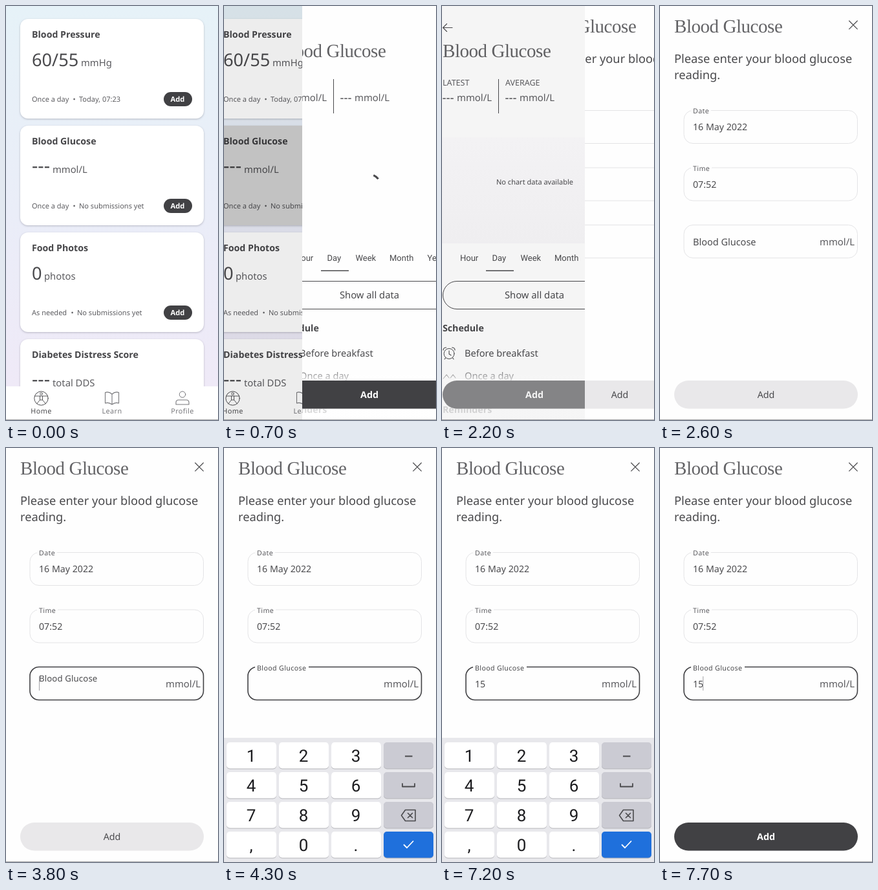
An HTML page that plays this animation: 328 px wide and 640 px high, repeating every 8 s.

```html
<!DOCTYPE html>
<html lang="en">
<head>
<meta charset="utf-8">
<title>Blood glucose entry</title>
<style>
html, body { margin: 0; width: 100%; height: 100%; overflow: hidden; background: #fff; }
#stage { position: relative; width: 328px; height: 640px; overflow: hidden; }
.page { position: absolute; inset: 0; overflow: hidden; }
svg { position: absolute; left: 0; top: 0; display: block; }
text { font-family: "Noto Sans", "Open Sans", sans-serif; fill: #4a4a4d; text-rendering: geometricPrecision; white-space: pre; }
.b { font-weight: 600; fill: #464649; }
.mid { font-weight: 500; }
.m { text-anchor: middle; }
.w { fill: #fff; }
.light { fill: #5c5c60; }
.rob { font-family: Roboto, sans-serif; }
.key { font-family: Roboto, sans-serif; fill: #1c1c1f; text-anchor: middle; }
.serif { font-family: "Liberation Serif", serif; fill: #636366; letter-spacing: -.45px; }
.label { letter-spacing: .4px; }
.line { fill: none; stroke: #4a4a4d; stroke-linecap: round; stroke-linejoin: round; }
.idle .line { stroke: #77777b; }
.idle text { fill: #77777b; }
.card { filter: drop-shadow(0 1.2px 1.5px rgba(60, 60, 75, .3)); }
</style>
</head>
<body>
<div id="stage">
  <div class="page"><svg id="home" width="328" height="640"></svg></div>
  <div class="page"><svg id="detail" width="328" height="640"></svg></div>
  <div class="page"><svg id="entry" width="328" height="640"></svg></div>
</div>
<script>
const W = 328, LOOP = 8000, TICK = 100, DARK = '#414144';
const $ = id => document.getElementById(id);

const text = (x, y, size, str, cls = '', more = '') =>
  `<text x="${x}" y="${y}" font-size="${size}" class="${cls}" ${more}>${str}</text>`;
const rect = (x, y, w, h, r, fill, more = '') =>
  `<rect x="${x}" y="${y}" width="${w}" height="${h}" rx="${r}" fill="${fill}" ${more}/>`;
const line = (d, width = 1.1, more = '') =>
  `<path class="line" d="${d}" stroke-width="${width}" ${more}/>`;
const circle = (x, y, r, width = 1) =>
  `<circle class="line" cx="${x}" cy="${y}" r="${r}" stroke-width="${width}"/>`;
const edge = rect(0, 639, W, 1, 0, '#a9a9ab');
const dim = rect(0, 0, W, 640, 0, '#000', 'class="dim" opacity="0"');

function card(y, title, value, unitX, unit, often, lastX, last) {
  const amount = value === '---'
    ? text(40, 72, 29, value, 'mid') : text(40, 73, 27.2, value);
  return `<g transform="translate(0 ${y})">` +
    rect(22, 0, 284, 154, 12, '#fff', 'class="card"') +
    text(40, 29, 14.2, title, 'b') + amount +
    text(unitX, 73, 14.8, unit, 'light') +
    text(40, 128, 11, often, 'light') +
    text(lastX - 9.5, 128, 11, '•', 'light') +
    text(lastX, 128, 11, last, 'light') +
    rect(244, 113, 44, 22, 11, DARK) +
    text(265.5, 128, 11.2, 'Add', 'b m w') + '</g>';
}

const nav = rect(0, 588, W, 52, 0, '#fff') +
  circle(54.5, 606.5, 10.7) + circle(54.5, 599.5, 1.8, .9) +
  line('M44.500 603H64.500M52.500 603V609L47.500 615M56.500 603V609L61.500 615M52.500 609H56.500', .9) +
  text(54.5, 630, 10.8, 'Home', 'm label mid') + '<g class="idle">' +
  line('M164 600Q159 595.500 153.500 597.500V614Q159 612 164 616Q169 612 174.500 614V597.500Q169 595.500 164 600V616') +
  circle(273, 600.5, 4.7) + line('M263 616V613Q263 609 267 609H279Q283 609 283 613V616Z') +
  text(164, 630, 10.8, 'Learn', 'm label') +
  text(273, 630, 10.8, 'Profile', 'm label') + '</g>';

$('home').innerHTML =
  `<defs><linearGradient id="sky" x2="0" y2="1"><stop stop-color="#e6f2f8"/>
   <stop offset=".5" stop-color="#eaedf8"/><stop offset="1" stop-color="#f0e9f7"/></linearGradient></defs>` +
  rect(0, 0, W, 640, 0, 'url(#sky)') +
  card(20, 'Blood Pressure', '60/55', 116, 'mmHg', 'Once a day', 113, 'Today, 07:23') +
  card(185, 'Blood Glucose', '---', 72, 'mmol/L', 'Once a day', 113, 'No submissions yet') +
  card(350, 'Food Photos', '0', 59, 'photos', 'As needed', 110, 'No submissions yet') +
  card(515, 'Diabetes Distress Score', '---', 72, 'total DDS', 'As needed', 110, 'No submissions yet') +
  rect(22, 185, 284, 154, 12, '#000', 'id="press" opacity="0"') + nav + edge + dim;

const alarm = circle(32, 537.5, 8) +
  line('M32 533V538L35 540M23 532Q23 528 27.500 528M41 532Q41 528 36.500 528M26.500 544L25 546M37.500 544L39 546');
const stat = (x) => text(x - .5, 147.500, 18.500, '---') + text(x + 22, 147, 14.9, 'mmol/L', 'light');
const tabs = [['Hour', 49], ['Day', 98.5], ['Week', 142.5], ['Month', 195], ['Year', 253.5]];

$('detail').innerHTML =
  `<defs><linearGradient id="band" x2="0" y2="1"><stop stop-color="#fcfbfd"/><stop offset="1" stop-color="#f8f7f9"/></linearGradient>
   <linearGradient id="fade" x2="0" y2="1"><stop stop-color="#fff" stop-opacity="0"/>
   <stop offset=".25" stop-color="#fff" stop-opacity=".8"/><stop offset="1" stop-color="#fff" stop-opacity=".8"/></linearGradient></defs>` +
  rect(0, 0, W, 640, 0, '#fefefe') +
  '<g id="chart">' + line('M37 33.500H22.500M28.500 27.500L22.500 33.500L28.500 39.500') +
  text(22, 123, 12.5, 'LATEST', 'light') + text(119, 123, 12.5, 'AVERAGE', 'light') +
  rect(0, 203, W, 164, 0, 'url(#band)') +
  text(164.5, 276, 11, 'No chart data available', 'm') + '</g>' +
  text(22, 79, 29, 'Blood Glucose', 'serif') +
  stat(22) + stat(119) + rect(108, 113, 1, 53, 0, '#4a4a4d') +
  line('M170.300 261.600A18 18 0 0 1 177.600 267.400', 3.2, 'id="spin" style="stroke-linecap:butt"') +
  tabs.map(([s, x]) => text(x, 394, 13, s, 'rob')).join('') +
  rect(89, 408.5, 43, 1.5, 0, '#4a4a4d') +
  rect(22.5, 425.5, 283, 43, 21.5, 'none', 'stroke="#4a4a4d"') +
  text(164, 452, 14.8, 'Show all data', 'm') +
  text(22, 502.500, 14.2, 'Schedule', 'b') +
  alarm + text(56, 541.500, 14.6, 'Before breakfast') +
  line('M23 576L28 570L32 575M34 575L38 570L42 575') + text(56, 576.500, 14.6, 'Once a day') +
  text(22, 629, 14.2, 'Reminders', 'b') +
  rect(0, 558, W, 82, 0, 'url(#fade)') +
  rect(22, 579, 284, 43.5, 21.75, '#fff') +
  rect(22, 579, 284, 43.5, 21.75, DARK, 'id="add1"') + text(164, 605.500, 14.3, 'Add', 'b m w') +
  edge + dim;

const box = (y, more = '') => rect(37, y, 268.5, 51, 14, '#fefefe', `stroke="#e4e4e6" ${more}`);
const field = (y, name, gap, value) => rect(48, y - 2, gap, 5, 0, '#fefefe') +
  text(51, y + 5, 10.6, name, 'label light') + text(51, y + 31, 14.2, value);

function keyboard() {
  const rows = ['123-', '456_', '789<', ',0.!'];
  let out = rect(0, 448, W, 192, 0, '#e8e8ec');
  rows.forEach((row, r) => [...row].forEach((c, i) => {
    const x = 4 + 81 * i, y = 455 + 46 * r;
    const fill = i < 3 ? '#fff' : r < 3 ? '#cbcbd3' : '#1f70dc';
    out += rect(x, y + 1, 77, 40.5, 5, '#b5b5ba') + rect(x, y, 77, 40.5, 5, fill, `id="k${r * 4 + i}"`);
    if (i < 3) out += text(x + 38, y + 30, 26, c, 'key');
  }));
  return out + line('M280 476.500H291.500', 2, 'style="stroke-linecap:butt"') +
    line('M276 519V523.500H295V519', 1.8) +
    line('M280.500 559.500H296V576.500H280.500L274.500 568ZM284.500 564.500L291.500 571.500M291.500 564.500L284.500 571.500', 1.6) +
    line('M278.500 613.500L283 618L292.500 608', 1.8, 'style="stroke:#fff"');
}

$('entry').innerHTML = rect(0, 0, W, 640, 0, '#fefefe') +
  text(22, 40.500, 29, 'Blood Glucose', 'serif') +
  line('M292.700 23L305.300 35.600M305.300 23L292.700 35.600', 1.2) +
  text(22, 88, 18.3, 'Please enter your blood glucose') + text(22, 113, 18.3, 'reading.') +
  box(161.5) + box(250) + box(338.5, 'id="box"') + '<g id="fields">' +
  field(161, 'Date', 31, '16 May 2022') + field(249.500, 'Time', 32, '07:52') +
  rect(48, 336, 83, 5, 0, '#fefefe', 'id="gap"') +
  text(51, 370, 14.5, 'Blood Glucose', '', 'id="hint"') + text(51, 369.5, 14.2, '', '', 'id="value"') +
  text(247, 370, 14.9, 'mmol/L', 'light') + '</g>' +
  rect(51, 353, 1, 22, 0, '#a2a2a6', 'id="caret"') +
  rect(22, 579, 284, 43.5, 21.75, '#e9e8ea', 'id="add2"') +
  text(164, 605.500, 14.3, 'Add', 'mid m', 'id="add2t"') +
  edge + `<g id="keys">${keyboard()}</g>`;

const clamp = v => Math.min(1, Math.max(0, v));
const ramp = (t, a, b) => clamp((t - a) / (b - a));
const within = (t, a, b) => t >= a && t < b;
const set = (id, attrs) => { for (const k in attrs) $(id).setAttribute(k, attrs[k]); };
const show = (id, on) => set(id, { display: on ? 'inline' : 'none' });

function bezier(x, x1, y1, x2, y2) {
  if (x <= 0 || x >= 1) return clamp(x);
  const at = (s, a, b) => 3 * (1 - s) ** 2 * s * a + 3 * (1 - s) * s * s * b + s ** 3;
  let lo = 0, hi = 1;
  for (let i = 0; i < 24; i++) {
    const mid = (lo + hi) / 2;
    if (at(mid, x1, x2) < x) lo = mid; else hi = mid;
  }
  return at(lo, y1, y2);
}

// Page change: the new page is unveiled from the right while both drift left.
function reveal(t, start) {
  const p = bezier(ramp(t, start, start + 425), .2083, .82, .25, 1);
  return p > .995 ? 1 : p;
}
function place(id, shown, covered) {
  const hidden = 1 - shown, el = $(id);
  const left = Math.round(W * hidden), shift = Math.round(W / 2 * hidden - W / 5 * covered);
  el.parentNode.style.transform = `translateX(${left}px)`;
  el.style.transform = `translateX(${shift - left}px)`;
  const shade = el.querySelector('.dim');
  if (shade) shade.setAttribute('opacity', .11 * covered);
}

function draw(t) {
  const toDetail = reveal(t, 620), toEntry = reveal(t, 2164);
  place('home', 1, toDetail);
  place('detail', toDetail, toEntry);
  place('entry', toEntry, 0);

  set('press', { opacity: t < 500 ? 0 : t < 600 ? .1 : .18 });
  const loaded = t >= 900;
  show('chart', loaded);
  show('spin', !loaded);
  set('spin', { transform: `rotate(${(t - 700) * .5} 163 278)` });
  set('add1', { opacity: t < 2000 ? 1 : t < 2100 ? .8 : .62 });
  show('fields', t >= 2300);

  const focus = t >= 3800, up = ramp(t, 3750, 3900);
  set('box', { stroke: focus ? DARK : '#e4e4e6', 'stroke-width': focus ? 1.6 : 1 });
  show('gap', up === 1);
  set('hint', { y: 370 - 26.500 * up, 'font-size': 14.5 - 3.9 * up, 'letter-spacing': .4 * up });

  const typed = t < 6500 ? '' : t < 6700 ? '1' : '15';
  $('value').textContent = typed;
  const caret = within(t, 3800, 4300) || within(t, 4800, 5300) || within(t, 5800, 6300) ||
    within(t, 6400, 7200) || t >= 7700;
  set('caret', { x: typed ? 50 + 8.1 * typed.length : 51 });
  show('caret', caret);
  set('add2', { fill: typed ? DARK : '#e9e8ea' });
  set('add2t', { class: typed ? 'b m w' : 'mid m' });

  const rise = 1 - (1 - ramp(t, 3850, 4300)) ** 3, fall = ramp(t, 7350, 7700) ** 2;
  set('keys', { transform: `translate(0 ${Math.round(192 * (1 - rise + fall))})` });
  set('k0', { fill: within(t, 6400, 6600) ? '#d4d4da' : '#fff' });
  set('k5', { fill: within(t, 6600, 6900) ? '#d4d4da' : '#fff' });
}

const began = performance.now();
function frame() {
  const t = (performance.now() - began) % LOOP;
  draw(Math.floor(t / TICK) * TICK);
  requestAnimationFrame(frame);
}
frame();
</script>
</body>
</html>
```
